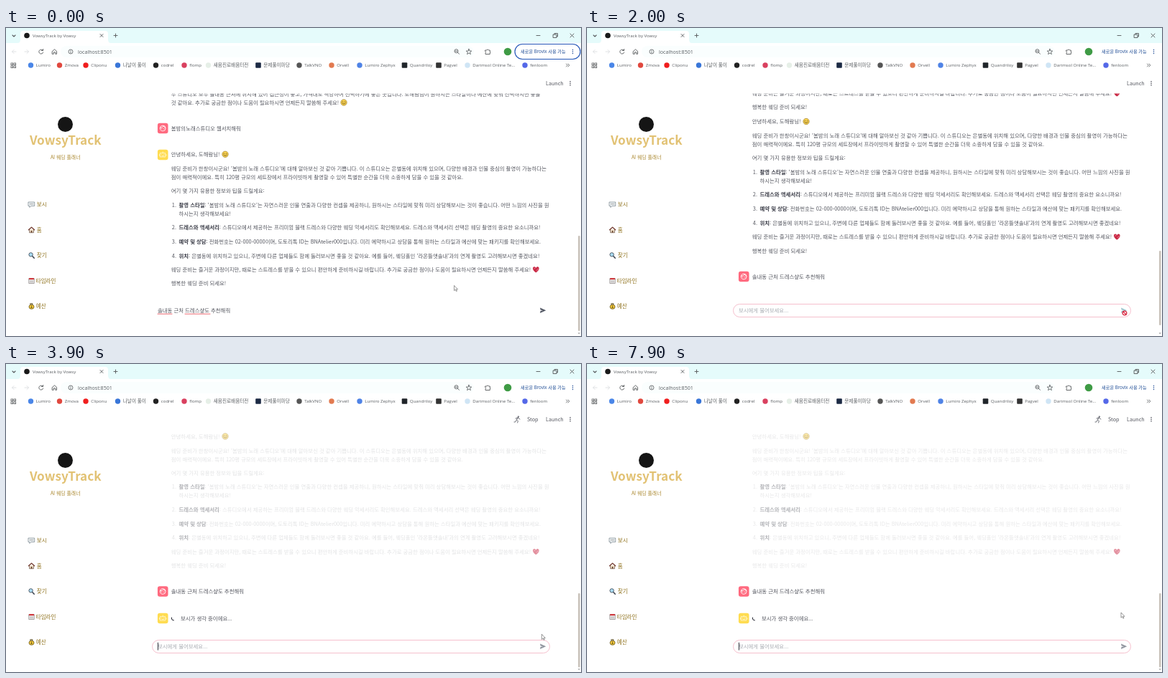
These frames come from a looping animation (800 px wide and 430 px high, 8000 ms). An HTML page:

```html
<!DOCTYPE html>
<html lang="ko">
<head>
<meta charset="utf-8">
<title>VowsyTrack</title>
<style>
  html, body { margin: 0; width: 100%; height: 100%; overflow: hidden; background: #fff; }
  svg { display: block; width: 800px; height: 430px; }
  text { font-family: "Noto Sans CJK KR", "Noto Sans CJK", "Noto Sans KR", sans-serif; white-space: pre; }
  .ui { font-family: "Open Sans", "Noto Sans CJK KR", "Noto Sans CJK", sans-serif; }
  .plain { fill-opacity: var(--plain, 1); }
  .bold { font-weight: 700; fill: #3a3c47; fill-opacity: var(--bold, 1); }
  .emoji { opacity: var(--emoji, 1); }
</style>
</head>
<body>
<svg id="stage" viewBox="0 0 800 430" xmlns="http://www.w3.org/2000/svg"></svg>
<script>
const LOOP = 8000, SIZE = 7.39, INK = '#54565f';
const stage = document.getElementById('stage');

function el(tag, attrs = {}, parent = stage) {
  const node = document.createElementNS('http://www.w3.org/2000/svg', tag);
  for (const k in attrs) node.setAttribute(k, attrs[k]);
  parent.appendChild(node);
  return node;
}
const group = (parent, x = 0, y = 0, scale = 1) =>
  el('g', { transform: `translate(${x} ${y}) scale(${scale})` }, parent);
const rect = (x, y, width, height, fill, parent, rx = 0) => el('rect', { x, y, width, height, fill, rx }, parent);
const dot = (cx, cy, r, fill, parent) => el('circle', { cx, cy, r, fill }, parent);
const shape = (d, fill, parent) => el('path', { d, fill }, parent);
const line = (d, stroke, width = 1, parent) => el('path', {
  d, stroke, 'stroke-width': width, fill: 'none', 'stroke-linecap': 'round', 'stroke-linejoin': 'round'
}, parent);

// y is the middle of the line
function text(x, y, str, parent, size = SIZE, attrs = {}) {
  const node = el('text', { x, y: y + size * 0.36, 'font-size': size, class: 'plain', fill: INK, ...attrs }, parent);
  node.textContent = str;
  return node;
}
const uiText = (x, y, str, size = 6.1, fill = '#5a5e62') => text(x, y, str, stage, size, { class: 'ui', fill });
function show(node, on) { node.style.display = on ? '' : 'none'; }

// ---------- browser window ----------
function browser() {
  const ink = '#55585b', pale = '#d8dbdd', navy = '#1c4a94';
  rect(0, 0, 800, 21, '#e5fbfb');
  shape('M16 21Q20 21 20 16V8Q20 4 24 4H138Q142 4 142 8V16Q142 21 146 21Z', '#fff');
  rect(76, 25, 575, 16, '#fafefe', stage, 8);
  line('M9 10L11 12L13 10', ink, 1.1);
  dot(29, 10.5, 3.8, '#1a1a1a');
  uiText(37, 11, 'VowsyTrack by Vowsy', 6.1);
  line('M131 8.5L135 12.5M135 8.5L131 12.5', ink, .9);
  line('M150 10.5H155M152.5 8V13', ink, .9);
  line('M738 10.5H743M785 8L790 13M790 8L785 13', ink, .9);
  line('M761.5 9H766V13.5H761.5ZM763 9V7.5H767.5V12H766', ink, .9);

  line('M14 33H8.5M11 30.5L8.5 33L11 35.5M26 33H31.5M29 30.5L31.5 33L29 35.5', pale, .8);
  line('M51 31A3 3 0 1 0 51.7 34M51.6 29.5V31.5H49.5', ink, .9);
  line('M64.5 32.5L67.5 29.8L70.5 32.5V36.3H68.7V33.8H66.3V36.3H64.5Z', ink, .9);
  el('circle', { cx: 90, cy: 33, r: 3, fill: 'none', stroke: ink, 'stroke-width': .8 });
  line('M90 32.8V34.6M90 31.4V31.5', ink, .8);
  uiText(100, 33, 'localhost:8501', 7.1);
  el('circle', { cx: 626.5, cy: 32.2, r: 2.5, fill: 'none', stroke: ink, 'stroke-width': .9 });
  line('M628.5 34.2L630.5 36.3M625.4 32.2H627.6', ink, .9);
  line('M644 29.3L645 32L647.8 32.1L645.6 33.8L646.4 36.6L644 35L641.6 36.6L642.4 33.8L640.2 32.1L643 32Z', ink, .8);
  line('M667 31H669A1.3 1.3 0 0 1 671.5 31H673.3V33A1.3 1.3 0 0 1 673.3 35V36.5H667V34.5A1 1 0 0 0 667 32.6Z', ink, .9);
  dot(698, 33, 5.3, '#3f9b45');
  uiText(716, 33, '새로운 Brovix 사용 가능', 6.2, navy);
  for (const dy of [-2.6, 0, 2.6]) dot(788.5, 33 + dy, .75, navy);

  for (const x of [7, 11]) for (const y of [49, 53])
    el('rect', { x, y, width: 2.6, height: 2.6, fill: 'none', stroke: ink, 'stroke-width': .8 });
  const marks = [
    [34.5, '#4a86e8', 'Lumiro'], [74.5, '#e0483e', 'Zmova'], [111, '#f01d1d', 'Cliponu'],
    [155.5, '#3976d8', '나날이 풀이'], [208.5, '#222', 'codrel'], [248, '#d9405f', 'flomp'],
    [281.5, '#e6efe7', '새움진로배움터전'], [351, '#1c2a44', '문제풀이마당', 1], [408, '#555', 'TalkVNO'],
    [453, '#e27a50', 'Orvell'], [492, '#4f83e6', 'Lumiro Zephyx'], [554.5, '#20252a', 'Quandriloy', 1],
    [602, '#333', 'Pagvel', 1], [642, '#cfe5f5', 'Darimsol Online Te...'], [722, '#5468e8', 'fenloom']
  ];
  for (const [x, color, name, square] of marks) {
    if (square) rect(x - 3.8, 48.2, 7.6, 7.6, color, stage, 1);
    else dot(x, 52, 3.7, color);
    uiText(x + 7.3, 52, name, /[가-힣]/.test(name) ? 6.6 : 6.1);
  }
  line('M779.5 50L781.3 52L779.5 54M782 50L783.8 52L782 54', ink, .8);
}

// ---------- sidebar ----------
function sidebar() {
  dot(82.5, 134.5, 10.5, '#151515');
  text(82.7, 157, 'VowsyTrack', stage, 17.1, { 'font-weight': 700, 'text-anchor': 'middle', fill: '#e2c274' });
  text(82.7, 181, 'AI 웨딩 플래너', stage, 6.85, { 'text-anchor': 'middle', fill: '#a8852a' });
  ['보시', '홈', '찾기', '타임라인', '예산'].forEach((name, i) =>
    text(i > 2 ? 41.8 : 42.8, 246.3 + i * 35.5, name, stage, 7.5, { fill: '#8d6f19' }));
  const icon = i => group(stage, 35.5, 246.3 + i * 35.5, .93);

  let g = icon(0);
  shape('M-4.5 -3.5H4.5V2.3H-.5L-3 4.5V2.3H-4.5Z', '#eef3f5', g);
  line('M-4.5 -3.5H4.5V2.3H-.5L-3 4.5V2.3H-4.5Z', '#66757d', .7, g);
  for (const x of [-2, 0, 2]) dot(x, -.6, .65, '#444', g);

  g = icon(1);
  rect(-3.2, -.8, 6.4, 5, '#f2e4cf', g);
  line('M-4.3 0L0 -4L4.3 0', '#6b2f24', 1.3, g);
  line('M-3.2 0V4.2H3.2V0', '#5b4034', .7, g);
  rect(-1, 1.2, 2, 3, '#6b4630', g);

  g = icon(2);
  line('M1 1L4 4.2', '#3b4450', 1.7, g);
  el('circle', { cx: -1, cy: -1, r: 2.9, fill: '#a9dcf5', stroke: '#46525e', 'stroke-width': 1 }, g);

  g = icon(3);
  rect(-4, -4, 8, 8, '#f8f6f6', g, 1);
  rect(-4, -4, 8, 2.2, '#cf3a3f', g, 1);
  line('M-2.4 .3H2.4M-2.4 2.2H2.4', '#999', .8, g);
  line('M-4 -3V4H4V-3', '#615a5a', .6, g);

  g = icon(4);
  line('M-1.6 -3.8H1.6L1 -2H-1Z', '#5b4c1c', 1, g);
  el('ellipse', { cx: 0, cy: 1, rx: 3.8, ry: 3.3, fill: '#f0c63a', stroke: '#5b4c1c', 'stroke-width': .8 }, g);
  line('M-.9 2.2H.9M0 -.3V2.2', '#5b4c1c', .8, g);
}

// ---------- chat ----------
function smiley(x, y, parent) {
  const g = group(parent, x, y);
  g.setAttribute('class', 'emoji');
  el('circle', { r: 4.2, fill: '#fbd552', stroke: '#8a6a20', 'stroke-width': .6 }, g);
  line('M-2.4 -.8Q-1.6 -2 -.8 -.8M.8 -.8Q1.6 -2 2.4 -.8M-2.2 1.2Q0 3.4 2.2 1.2', '#5d4316', .8, g);
}
function heart(x, y, parent) {
  const g = group(parent, x, y);
  g.setAttribute('class', 'emoji');
  shape('M0 4.3C-6 .3 -4.8 -4 -2.2 -4Q-.5 -4 0 -2.3Q.5 -4 2.2 -4C4.8 -4 6 .3 0 4.3Z', '#c92a45', g);
  line('M-2.8 -1.2Q-2.3 -2.6 -1.2 -2M1 1.2Q2.4 .2 2.8 -1', '#f59ab0', .8, g);
}
function avatar(y, bot, parent) {
  const g = group(parent, 218.2, y);
  rect(-7.3, -7.3, 14.6, 14.6, bot ? '#ffdc50' : '#ff6a7f', g, 3);
  const pen = bot ? '#fff6cf' : '#fff';
  if (bot) line('M-3.5 -2.4H3.5V3H-3.5ZM0 -2.4V-4M-4.8 -.3V1.2M4.8 -.3V1.2M-1.4 1.6H1.4', pen, .9, g);
  else line('M-3.8 0A3.8 3.8 0 1 0 3.8 0A3.8 3.8 0 1 0 -3.8 0M-3.6 -.8Q0 -.6 1 -3.2Q1.8 -1 3.6 -.8', pen, .9, g);
  dot(-1.4, bot ? -.4 : .7, .6, pen, g);
  dot(1.4, bot ? -.4 : .7, .6, pen, g);
}
// line offset, list item (9 = continued), text
const reply = [
  [20, 0, "웨딩 준비가 한창이시군요! '봄밤의 노래 스튜디오'에 대해 알아보신 것 같아 기쁩니다. 이 스튜디오는 은별동에 위치해 있으며, 다양한 배경과 인물 중심의 촬영이 가능하다는"],
  [32, 0, '점이 매력적이에요. 특히 120평 규모의 세트장에서 프라이빗하게 촬영할 수 있어 특별한 순간을 더욱 소중하게 담을 수 있을 것 같아요.'],
  [51.3, 0, '여기 몇 가지 유용한 정보와 팁을 드릴게요:'],
  [70.8, 1, "촬영 스타일|: '봄밤의 노래 스튜디오'는 자연스러운 인물 연출과 다양한 컨셉을 제공하니, 원하시는 스타일에 맞춰 미리 상담해보시는 것이 좋습니다. 어떤 느낌의 사진을 원"],
  [82.8, 9, '하시는지 생각해보세요!'],
  [102.3, 2, '드레스와 액세서리|: 스튜디오에서 제공하는 프리미엄 블랙 드레스와 다양한 웨딩 악세서리도 확인해보세요. 드레스와 액세서리 선택은 웨딩 촬영의 중요한 요소니까요!'],
  [122, 3, '예약 및 상담|: 전화번호는 02-000-0000이며, 도토리톡 ID는 BNAtelier000입니다. 미리 예약하시고 상담을 통해 원하는 스타일과 예산에 맞는 패키지를 확인해보세요.'],
  [141.6, 4, "위치|: 은별동에 위치하고 있으니, 주변에 다른 업체들도 함께 둘러보시면 좋을 것 같아요. 예를 들어, 웨딩홀인 '라온뜰앳솔내'과의 연계 촬영도 고려해보시면 좋겠네요!"],
  [161, 0, '웨딩 준비는 즐거운 과정이지만, 때로는 스트레스를 받을 수 있으니 편안하게 준비하시길 바랍니다. 추가로 궁금한 점이나 도움이 필요하시면 언제든지 말씀해 주세요!'],
  [180.5, 0, '행복한 웨딩 준비 되세요!']
];
function answer(y, parent) {
  const g = group(parent, 0, y);
  text(229.8, 0, '안녕하세요, 도해람님!', g);
  smiley(305, 0, g);
  for (const [dy, item, str] of reply) {
    if (item && item < 9) text(230.8, dy, item + '.', g);
    const node = text(item ? 240.5 : 229.8, dy, '', g);
    const parts = str.split('|');
    parts.forEach((part, i) => {
      el('tspan', { class: parts[1] && !i ? 'bold' : 'plain' }, node).textContent = part;
    });
  }
  heart(737.3, 161, g);
  return g;
}

browser();
const ring = el('rect', { x: 708, y: 22.5, width: 91, height: 21, rx: 10.5, fill: 'none', stroke: '#2457b8', 'stroke-width': 1.2 });
sidebar();

const clip = el('clipPath', { id: 'view' });
rect(170, 91.5, 626, 286.5, '#000', clip);
const chat = group(el('g', { 'clip-path': 'url(#view)' }));
text(229.8, 92, '두 스튜디오 모두 솔내동 근처에 위치해 있어 접근성이 좋고, 가격대도 적당하여 선택하기에 좋은 곳입니다. 도해람님이 원하시는 스타일이나 예산에 맞춰 선택하시면 좋을', chat);
text(229.8, 104, '것 같아요. 추가로 궁금한 점이나 도움이 필요하시면 언제든지 말씀해 주세요!', chat);
smiley(470, 104, chat);
avatar(140, false, chat);
text(229.8, 140, '봄밤의노래스튜디오 웹서치해줘', chat);
avatar(177, true, chat);
answer(176.3, chat);
const copy = answer(376.5, chat);
const ask = group(chat);
avatar(593, false, ask);
text(229.8, 593, '솔내동 근처 드레스샾도 추천해줘', ask);
const thinking = group(chat);
avatar(630.5, true, thinking);
text(243, 630.5, '보시가 생각 중이에요...', thinking);
const spinner = line('M2.4 -2.4A3.4 3.4 0 0 1 2.4 2.4', '#33353f', 1.1, thinking);

// ---------- header ----------
text(751, 77.3, 'Launch', stage, 7.2);
for (const dy of [-2.5, 0, 2.5]) dot(785, 77.3 + dy, .75, '#31333f');
const status = group(stage);
text(725, 77.3, 'Stop', status, 7.2);
const poses = {
  R: 'M712.8 73A.8 .8 0 1 0 712.9 73M712 75L710.4 78L712.4 79.6L711.6 82M710.4 78L708.6 81H707M709 76L712 75L715 77',
  B: 'M706 79.5A2.2 2.2 0 1 0 710.4 79.5A2.2 2.2 0 1 0 706 79.5M712.6 79.5A2.2 2.2 0 1 0 717 79.5A2.2 2.2 0 1 0 712.6 79.5M711.5 80.5V78L709.6 76.5L712 74.5L713.5 76.3H715M713 72.8V72.7',
  S: 'M707 78Q709 76.8 711 78T715.5 78M707 80.6Q709 79.4 711 80.6T715.5 80.6M708 73.5H711L713.5 76M714.8 74.5V74.4',
  W: 'M706.5 73.5H715.5M707 72V75M715 72V75M709 73.5L711 76.5L713 73.5M711 76.5V79L709 82M711 79L713 82M711 74V73.9'
};
const athletes = Object.entries(poses).map(([key, d]) => [key, line(d, '#4b4d57', .8, status)]);

// ---------- input ----------
const field = el('rect', { x: 203.5, y: 385.5, width: 553, height: 18, rx: 9, fill: '#fff', stroke: '#f3b0c0', 'stroke-width': .8 });
const typed = group(stage);
text(211, 394.3, '솔내동 근처 드레스샾도 추천해줘', typed);
line('M211 399.2H231M249 399.2H284', '#e8424c', .8, typed);
const hint = text(211, 394.3, '보시에게 물어보세요...', stage, SIZE, { fill: '#a9acb2' });
const caret = rect(210.9, 388.8, 1, 10.8, '#31333f');
const plane = shape('M743 390.5L751.3 394.2L743 398L743.6 395L747 394.2L743.6 393.4Z', '#555a66');

const thumb = rect(796, 290, 2.6, 133, '#cac3bb', stage, 1.2);
shape('M795.6 425.6H798.8L797.2 427.6Z', '#9a9a9a');

// ---------- pointer ----------
const arrow = el('path', { d: 'M0 0V7.2L1.7 5.7L2.9 8.2L4 7.7L2.8 5.3H5Z', fill: '#fff', stroke: '#555', 'stroke-width': .6 });
const barred = group(stage);
el('circle', { r: 2.9, fill: '#fff', stroke: '#d8213c', 'stroke-width': 1.3 }, barred);
line('M-2 -2L2 2', '#d8213c', 1.3, barred);

// ---------- timeline ----------
function track(keys, t, ease = u => u) {
  let a = keys[0];
  for (const b of keys) {
    if (t < b[0]) {
      const u = ease((t - a[0]) / (b[0] - a[0]));
      return a.slice(1).map((v, i) => v + (b[i + 1] - v) * u);
    }
    a = b;
  }
  return a.slice(1);
}
const smooth = u => u * u * (3 - 2 * u);
const step = (keys, t) => keys.filter(k => t >= k[0]).pop().slice(1);

const pointer = [[0, 623.5, 359.5], [100, 623.5, 359.5], [900, 750, 396], [1800, 750.5, 397],
  [2000, 748, 398], [3000, 747, 399], [3500, 747, 399], [4400, 743, 347]];
// time, then opacity of plain text, bold text and emoji
const fade = [[2200, 1, 1, 1], [3000, .3, .5, .62], [3500, .18, .4, .52], [5000, .14, .38, .5]];
// time, scroll offset, thumb top, thumb height
const scroll = [[0, 0, 290, 133], [1600, 0, 241, 104], [1900, 246, 311, 104], [2200, 275.5, 320, 103.5]];
const SENT = 1200, BUSY = 2200;
const sports = 'RWBRSBSRWBRS';

function draw(t) {
  const [offset, top, height] = step(scroll, t);
  chat.setAttribute('transform', `translate(0 ${-offset})`);
  thumb.setAttribute('y', top);
  thumb.setAttribute('height', height);

  const sent = t >= SENT;
  show(ring, t < 1400);
  show(field, sent);
  show(typed, !sent);
  show(hint, sent);
  show(caret, sent && (t - 1300 + 1060) % 1060 < 530);

  show(copy, t >= 1600);
  show(ask, t >= 1900);
  show(thinking, t >= BUSY);
  show(status, t >= BUSY + 100);
  const dim = track(fade, Math.max(t, BUSY));
  ['--plain', '--bold', '--emoji'].forEach((name, i) => copy.style.setProperty(name, dim[i]));

  spinner.setAttribute('transform', `translate(233.8 630) rotate(${180 + t * .36})`);
  const sport = sports[Math.floor(t / 100) % sports.length];
  for (const [key, node] of athletes) show(node, key === sport);

  const [x, y] = track(pointer, t, smooth);
  const blocked = t >= 1400 && y > 386;
  plane.setAttribute('fill', !sent ? '#555a66' : blocked ? '#9fc4cc' : '#9297a0');
  show(arrow, !blocked);
  show(barred, blocked);
  for (const node of [arrow, barred]) node.setAttribute('transform', `translate(${x} ${y})`);
}

const start = performance.now();
function tick() {
  draw((performance.now() - start) % LOOP);
  requestAnimationFrame(tick);
}
tick();
</script>
</body>
</html>
```
